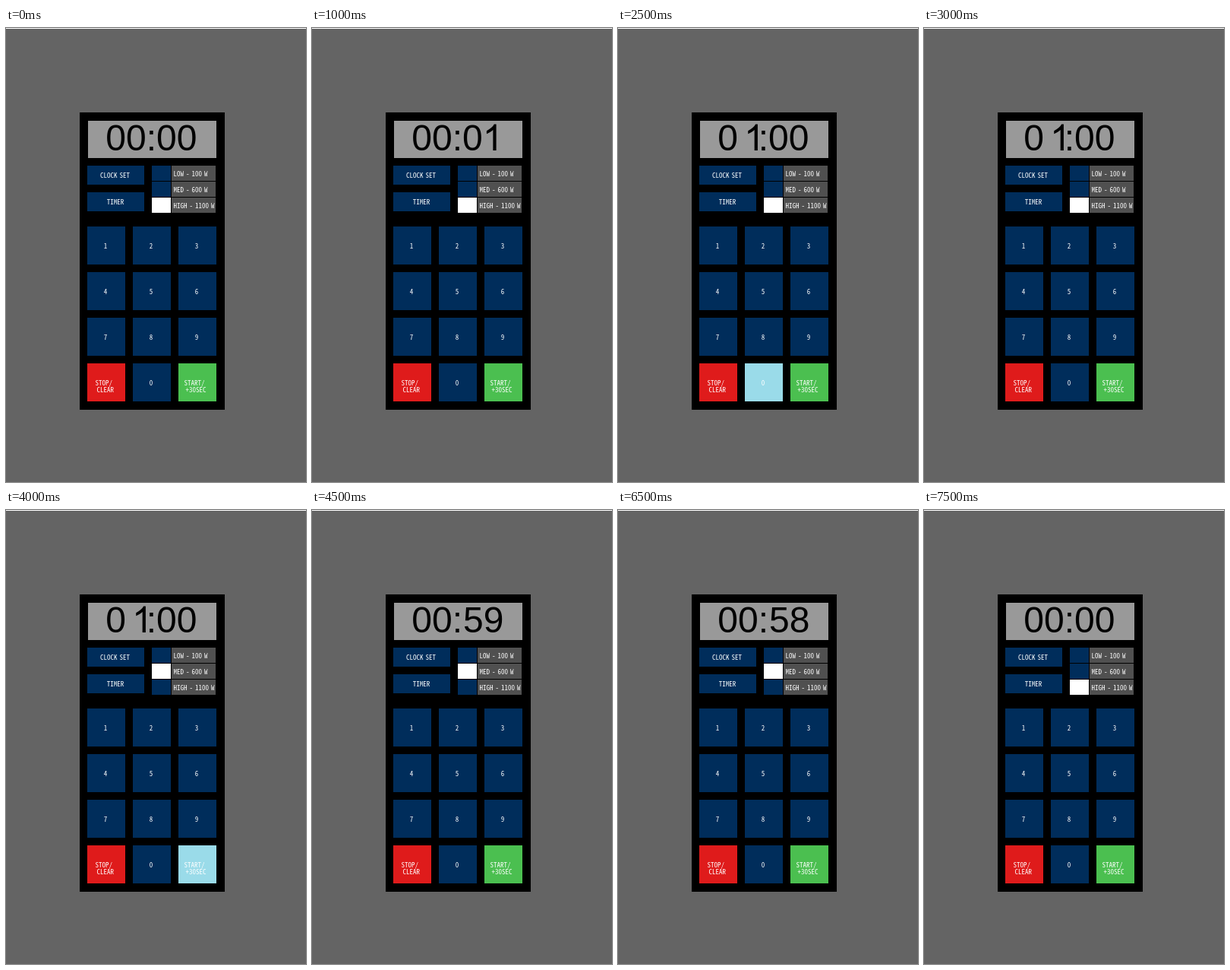
These frames come from a looping animation (395 px wide and 597 px high, 8 s). An HTML page:

```html
<!DOCTYPE html>
<html lang="en">
<head>
<meta charset="utf-8">
<title>Microwave panel</title>
<style>
  html, body { margin: 0; height: 100%; overflow: hidden; background: #646464; }
  svg { display: block; }
  text { fill: #fff; font: 9px "Noto Sans Mono CJK JP", Roboto, sans-serif; word-spacing: -1.5px; white-space: pre; }
  #clock text { fill: #000; font: 48px "Liberation Sans", Arial, sans-serif; }
  .mid { text-anchor: middle; }
</style>
</head>
<body>
<svg id="stage" width="395" height="597" viewBox="0 0 395 597"></svg>
<script>
const NAVY = '#002d5b', LIT = '#9adbe9', RED = '#df1b1b', GREEN = '#4bbf50';
const STEP = 500, LOOP = 8000;
const stage = document.getElementById('stage');

function add(tag, attrs, text = '', parent = stage) {
  const el = document.createElementNS('http://www.w3.org/2000/svg', tag);
  for (const k in attrs) el.setAttribute(k, attrs[k]);
  el.textContent = text;
  return parent.appendChild(el);
}
const box = (x, y, width, height, fill) => add('rect', { x, y, width, height, fill });
const label = (x, y, text, cls = '') => add('text', { x, y, class: cls }, text);

box(0, 0, 395, 597, '#646464');
box(0, 0, 395, 1, '#fff');
box(97, 111, 191, 391, '#000');
box(108, 122, 169, 49, '#999');

box(107, 181, 75, 25, NAVY);
label(143.5, 197, 'CLOCK SET', 'mid');
box(107, 216, 75, 25, NAVY);
label(144, 232, 'TIMER', 'mid');

const powers = ['LOW - 100 W', 'MED - 600 W', 'HIGH - 1100 W'].map((name, i) => {
  const y = 181 + 21 * i;
  box(218, y, 58, 20, '#505050');
  label(220.5, y + 14, name);
  return box(192, y, 25, 20, NAVY);
});

const keys = {};
[...'123456789S0G'].forEach((id, i) => {
  const x = 107 + 60 * (i % 3), y = 261 + 60 * Math.floor(i / 3);
  const color = { S: RED, G: GREEN }[id] || NAVY;
  keys[id] = { color, rect: box(x, y, 50, 50, color) };
  if (color === NAVY) label(x + 24, y + 29, id, 'mid');
});
label(117.5, 470, 'STOP/');
label(119.5, 479, 'CLEAR');
label(234.5, 470, 'START/');
label(236.5, 479, '+30SEC');

const clock = add('g', { id: 'clock' });
const slots = [131.3, 158, 184.7, 198, 224.7];
// The numeral one has no foot, so it is drawn as an outline.
const ONE = 'M763 0H583V1147Q518 1085 412 1023T223 930V1104Q374 1175 487 1276T647 1472H763Z';

function showTime(time) {
  clock.textContent = '';
  [...time].forEach((c, i) => {
    let x = slots[i];
    if (c === '1') {
      if (i === 1) x += 8;
      const s = 48 / 2048;
      add('path', { d: ONE, transform: `translate(${x} 161) scale(${s} ${-s})` }, '', clock);
    } else {
      if (i > 2 && c !== '0') x++;
      add('text', { x, y: 161 }, c, clock);
    }
  });
}

// start step, time, selected power, lit key
const states = [
  [0, '00:00', 2, ''],
  [1, '00:01', 2, '1'],
  [2, '00:01', 2, ''],
  [3, '00:10', 2, '0'],
  [4, '00:10', 2, ''],
  [5, '01:00', 2, '0'],
  [6, '01:00', 2, ''],
  [7, '01:00', 1, ''],
  [8, '01:00', 1, 'G'],
  [9, '00:59', 1, ''],
  [11, '00:58', 1, ''],
  [12, '00:58', 1, 'S'],
  [13, '00:58', 1, ''],
  [14, '00:00', 2, 'S'],
  [15, '00:00', 2, '']
];

let shown;
function draw() {
  const step = Math.floor(performance.now() % LOOP / STEP);
  const state = states.filter(s => s[0] <= step).pop();
  if (state !== shown) {
    shown = state;
    const [, time, power, lit] = state;
    showTime(time);
    powers.forEach((p, i) => p.setAttribute('fill', i === power ? '#fff' : NAVY));
    for (const id in keys) keys[id].rect.setAttribute('fill', id === lit ? LIT : keys[id].color);
  }
  requestAnimationFrame(draw);
}
draw();
</script>
</body>
</html>
```
